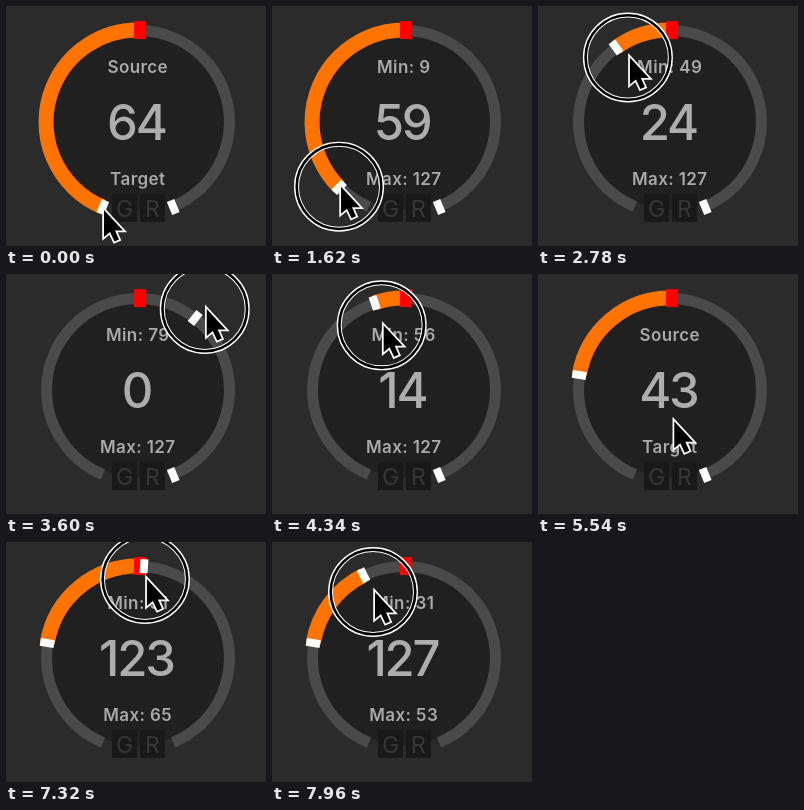
An HTML page with a canvas that plays this animation: 260 by 240 pixels, repeating every 8000 ms.

```html
<!DOCTYPE html>
<html lang="en">
<head>
<meta charset="utf-8">
<title>Range dial</title>
<style>
html, body { margin: 0; width: 100%; height: 100%; overflow: hidden; background: #2b2b2b; }
canvas { display: block; }
</style>
</head>
<body>
<canvas id="stage" width="260" height="240"></canvas>
<script>
const ctx = document.getElementById('stage').getContext('2d');
const LOOP = 8000, CX = 132, CY = 116, INPUT = 64, TOP = 127;
const SWEEP = 315 / TOP;          // degrees per unit
const LAG = 15;                   // the dial trails the pointer a little
const MIN_PRESS = 400, MIN_RELEASE = 5230, MAX_PRESS = 6260;

// pointer moves: each passes its points at even intervals, at rest at both ends
const A = [96, 202], B = [199, 33], C = [72, 105.5], D = [171, 187], E = [167.5, 204];
const moves = [
  { from: 800, to: 3400, pts: [A, [74, 187], [53, 143], [86, 52], B] },
  { from: 3580, to: 5200, pts: [B, [125, 43], [96, 63], C] },
  { from: 5360, to: 5720, pts: [C, [134, 145], D] },
  { from: 5880, to: 6120, pts: [D, E] },
  { from: 6480, to: 7960, pts: [E, [213.5, 48], [151, 35], [116, 40], [101, 48]] }
];

const clamp = (v, lo, hi) => Math.max(lo, Math.min(hi, v));

function pointer(t) {
  const { from, to, pts } = moves.findLast(m => m.from <= t) || moves[0];
  const last = pts.length - 1;
  const u = clamp((t - from) / (to - from), 0, 1) * last;
  const i = Math.min(Math.floor(u), last - 1), s = u - i;
  const ease = s * s * (3 - 2 * s);
  const slope = (j, k) => j % last ? (pts[j + 1][k] - pts[j - 1][k]) / 2 : 0;
  return [0, 1].map(k => pts[i][k] + (pts[i + 1][k] - pts[i][k]) * ease +
    s * (1 - s) * ((1 - s) * slope(i, k) - s * slope(i + 1, k)));
}

function dialValue(t) {
  const [x, y] = pointer(t - LAG);
  const deg = Math.atan2(x - CX, CY - y) * 180 / Math.PI;
  return Math.floor(clamp(TOP / 2 + deg / SWEEP, 0, TOP));
}

const angle = v => (v - TOP / 2) * SWEEP * Math.PI / 180;

function circle(x, y, r, color, width, from = 0, to = 2 * Math.PI) {
  ctx.beginPath();
  ctx.arc(x, y, r, from - Math.PI / 2, to - Math.PI / 2);
  ctx.strokeStyle = color;
  ctx.lineWidth = width;
  ctx.stroke();
}

function marker(v, color, w, h) {
  ctx.save();
  ctx.translate(CX, CY);
  ctx.rotate(angle(v));
  ctx.fillStyle = color;
  ctx.fillRect(-w / 2, -92 - h / 2, w, h);
  ctx.restore();
}

function text(str, x, y, font, color, spacing = 0) {
  ctx.font = font + ' Inter, Roboto, sans-serif';
  ctx.letterSpacing = spacing + 'px';
  ctx.textAlign = 'center';
  ctx.fillStyle = color;
  ctx.fillText(str, x + spacing / 2, y);
}

function button(label, x) {
  ctx.fillStyle = '#191919';
  ctx.fillRect(x - 12.5, 188, 25, 28);
  text(label, x, 211, '23px', '#363636');
}

function arrow(x, y) {
  const shape = new Path2D('M0 0V27L6 22L10.5 31.5L15 29.5L11 20.5H19Z');
  ctx.save();
  ctx.translate(x, y);
  ctx.strokeStyle = '#fff';
  ctx.lineWidth = 3.5;
  ctx.stroke(shape);
  ctx.fillStyle = '#000';
  ctx.fill(shape);
  ctx.restore();
}

function draw(t) {
  const dragging = t >= MIN_PRESS && t < MIN_RELEASE || t >= MAX_PRESS;
  const min = t < MIN_PRESS ? 0 : dialValue(Math.min(t, MIN_RELEASE));
  const max = t < MAX_PRESS ? TOP : dialValue(t);
  const value = Math.floor(clamp((INPUT - min) * TOP / (max - min), 0, TOP));
  const end = Math.min(INPUT, max);

  ctx.fillStyle = '#2b2b2b';
  ctx.fillRect(0, 0, 260, 240);
  ctx.beginPath();
  ctx.arc(CX, CY, 87, 0, 7);
  ctx.fillStyle = '#202020';
  ctx.fill();

  circle(CX, CY, 91.5, '#4a4a4a', 11, angle(0), angle(TOP));
  if (min < end) circle(CX, CY, 92, '#ff7300', 15, angle(min), angle(end));
  marker(INPUT, '#f00', 12, 18);
  marker(min, '#fff', 8, 14);
  marker(max, '#fff', 8, 14);

  button('G', 118.5);
  button('R', 146.5);
  text(dragging ? 'Min: ' + min : 'Source', 131.5, 67, '600 17px', '#a9a9a9', 0.4);
  text(dragging ? 'Max: ' + max : 'Target', 131.5, 179, '600 17px', '#a9a9a9', 0.4);
  text(value, 131.5, 134, '500 49px', '#adadad', -2.2);

  const [x, y] = pointer(t);
  if (dragging) {
    circle(x, y + 2, 42.5, '#fff', 5);
    circle(x, y + 2, 42.3, '#000', 2.6);
  }
  arrow(x + 2, y + 2);
}

function frame() {
  draw(performance.now() % LOOP);
  requestAnimationFrame(frame);
}
frame();
</script>
</body>
</html>
```
